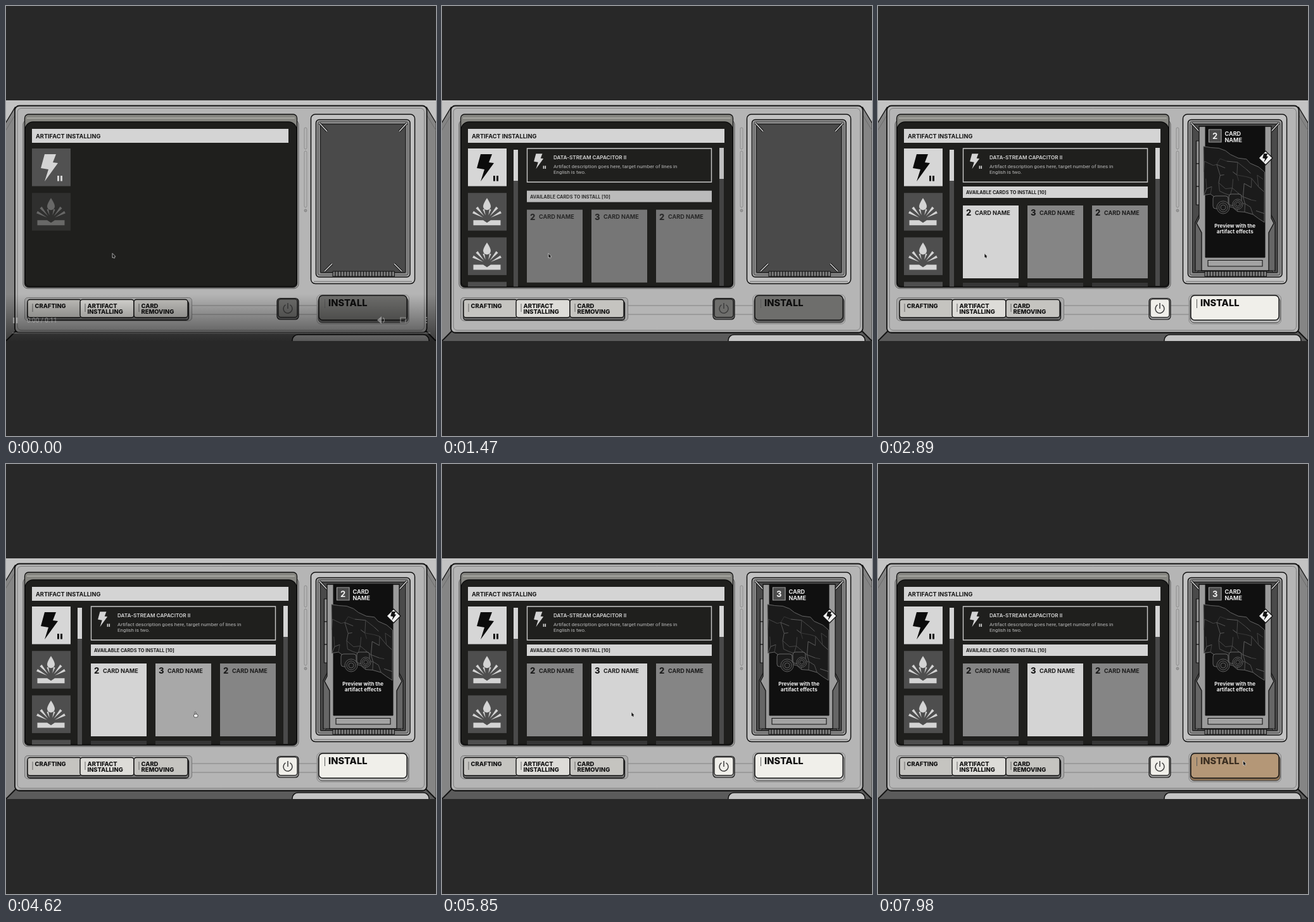
An HTML page with a canvas for the animation above (8 s loop, 679 by 679 pixels).

```html
<!DOCTYPE html>
<html lang="en">
<head>
<meta charset="utf-8">
<title>Artifact installing</title>
<style>
  html, body { margin: 0; width: 100%; height: 100%; overflow: hidden; background: #282828; }
  canvas { display: block; width: 100%; height: 100%; }
</style>
</head>
<body>
<canvas id="stage" width="679" height="679"></canvas>
<script>
const c = document.getElementById('stage').getContext('2d');
const LOOP = 8000;
const FONT = 'Inter, "Noto Sans", sans-serif';
const BODY = 'Roboto, sans-serif';
const INK = '#111', LIGHT = '#d4d4d4', GROOVE = '#828282';
const SIDES = [-1, 1];
const MID = 339.3, BAY_MID = 564;

// Main panels as [left, top, right, bottom].
const CASE = [14, 157.5, 664.5, 516];
const SCREEN = [30, 183, 459, 443];
const BAY = [481.5, 171, 645.5, 438.5];
const WELL = [489.5, 179.5, 638, 428];

const clamp = v => Math.max(0, Math.min(1, v));
const ramp = (t, start, span) => clamp((t - start) / span);
const easeOut = p => 1 - (1 - p) ** 3;
const easeInOut = p => p * p * (3 - 2 * p);
const mix = (a, b, p) => a + (b - a) * p;
const blend = (a, b, p) => a.map((v, i) => mix(v, b[i], p));
const rgb = v => `rgb(${v.map(Math.round).join(',')})`;
const gray = v => rgb([v, v, v]);

function random(seed) {
  return () => {
    seed = (seed * 16807) % 2147483647;
    return seed / 2147483647;
  };
}

function paint(fill, stroke, width = 1) {
  if (fill) { c.fillStyle = fill; c.fill(); }
  if (stroke) { c.strokeStyle = stroke; c.lineWidth = width; c.stroke(); }
}
function box([x1, y1, x2, y2], r, fill, stroke, width) {
  c.beginPath();
  c.roundRect(x1, y1, x2 - x1, y2 - y1, r);
  paint(fill, stroke, width);
}
const inset = ([x1, y1, x2, y2], d) => [x1 + d, y1 + d, x2 - d, y2 - d];
function fillRect(x, y, w, h, color) {
  c.fillStyle = color;
  c.fillRect(x, y, w, h);
}
function line(x1, y1, x2, y2, color, width = 1) {
  c.beginPath();
  c.moveTo(x1, y1);
  c.lineTo(x2, y2);
  paint(null, color, width);
}
function poly(pts, fill, stroke, width) {
  c.beginPath();
  for (const [x, y] of pts) c.lineTo(x, y);
  c.closePath();
  paint(fill, stroke, width);
}
// Closed shape from its right half, given as [distance from axis, y].
function mirrored(axis, half, ...style) {
  const right = half.map(([d, y]) => [axis + d, y]);
  const left = half.map(([d, y]) => [axis - d, y]).reverse();
  poly([...right, ...left], ...style);
}
function arc(x, y, r, from, to, fill, stroke, width) {
  c.beginPath();
  c.arc(x, y, r, from, to);
  paint(fill, stroke, width);
}
const disc = (x, y, r, ...style) => arc(x, y, r, 0, 2 * Math.PI, ...style);
function text(s, x, y, size, color, weight = 700, align = 'left', family = FONT) {
  c.font = `${weight} ${size}px ${family}`;
  c.textAlign = align;
  c.fillStyle = color;
  c.fillText(s, x, y);
}
function layer(alpha, draw) {
  if (alpha <= 0) return;
  c.save();
  c.globalAlpha *= clamp(alpha);
  draw();
  c.restore();
}
function at(x, y, scale, draw) {
  c.save();
  c.translate(x, y);
  c.scale(scale, scale);
  draw();
  c.restore();
}

function drawCase() {
  fillRect(0, 0, 679, 679, '#282828');
  c.save();
  c.beginPath();
  c.rect(0, 149, 679, 380);
  c.clip();
  fillRect(0, 149, 679, 380, '#c3c3c3');
  mirrored(MID, [[325, 160], [340, 185], [340, 529], [325, 514]], '#858585', INK, 1.3);
  mirrored(MID, [[324, 514], [340, 530]], '#5b5b5b', INK, 1.2);
  for (const s of SIDES) line(MID + s * 325, 172, MID + s * 340, 197, '#6b6b6b');
  box([452, 519, 668, 545], 9, '#c4c4c4', INK, 1.5);

  box(CASE, 7, '#b5b5b5', INK, 1.8);
  box(inset(CASE, 4), 6, null, '#7c7c7c');
  line(20, 514, 658, 514, '#858585');

  box(inset(SCREEN, -3), 7, '#a6a6a4', '#555');
  box([29.5, 171, 459.5, 444], 6, '#858580', INK, 1.3);
  line(33, 177, 456, 177, '#a5a59f', 2);

  box([471, 192, 475, 226], 2, null, '#8c8c8c');
  box([471, 229, 475, 318], 2, null, '#8c8c8c');
  disc(473, 323, 2, '#9a9a9a', GROOVE);
  for (const y of [473, 487]) line(293, y, 491, y, GROOVE);
  c.restore();
}

function drawBay() {
  box(BAY, 7, '#c2c2c2', INK, 1.5);
  line(486, 435, 641, 435, '#666');
  box(WELL, 5, '#a2a2a2', INK, 1.5);
  box(inset(WELL, 3), 3, '#8b8b8b', '#444');
  box(inset(WELL, 7), 1, '#4a4a4a', '#222', 1.3);
  box([516, 419, 613.5, 427], 0, '#7c7c7c', INK);
  for (let x = 520; x < 613; x += 4.45) line(x, 419, x, 427, INK, 1.2);
  for (const s of SIDES) {
    for (const [color, width] of [[INK, 3.6], ['#d0d0d0', 1.6]]) {
      line(BAY_MID + s * 69, 185, BAY_MID + s * 57, 198, color, width);
      line(BAY_MID + s * 61, 419, BAY_MID + s * 49, 407, color, width);
    }
  }
}

function drawBolt(color) {
  poly([[-10, -21], [8, -21], [3, -8], [11, -7], [-10, 22], [-4, 3], [-16, 1]], color);
}
function drawBoltTwo(color) {
  drawBolt(color);
  for (const x of [10, 15]) fillRect(x, 13, 3, 8.5, color);
}
function drawSplash(color) {
  c.beginPath();
  c.moveTo(0, -22);
  c.quadraticCurveTo(6, -13, 6, -9);
  c.arc(0, -9, 6, 0, Math.PI);
  c.quadraticCurveTo(-6, -13, 0, -22);
  paint(color);
  for (const s of SIDES) {
    for (let i = 0; i < 3; i++) {
      const a = 0.32 + 0.38 * i, far = i ? 25 : 17;
      const spot = (r, turn) => [s * r * Math.sin(a + turn), 12 - r * Math.cos(a + turn)];
      poly([spot(7, 0), spot(far, -0.08), spot(far, 0.08)], color);
    }
  }
  mirrored(0, [[0, 17], [6, 13], [21.5, 13], [21.5, 21], [0, 21]], color);
}

function drawScroll(x, y) {
  fillRect(x, y, 7, 218, '#4a4a4a');
  fillRect(x, y, 7, 49, LIGHT);
}
function drawList(t, picked) {
  for (let i = 0; i < 4; i++) {
    layer(ramp(t, 70 * i - 100, 90), () => {
      const y = 225 + 70.2 * i;
      const shade = i ? 0x4e : mix(0x51, 0xd6, picked);
      fillRect(41, y, 61, 59.5, gray(shade));
      at(71, y + 30, 1, () => i ? drawSplash(LIGHT) : drawBoltTwo(gray(mix(0xd4, 0x0c, picked))));
    });
  }
  layer(ramp(t, 40, 90), () => drawScroll(113, 227));
}
function drawInfo() {
  box([134.5, 225, 425.5, 278], 0, null, '#c9c9c9', 1.4);
  at(154, 245, 0.56, () => drawBoltTwo(LIGHT));
  text('DATA-STREAM CAPACITOR II', 176, 242, 8.2, LIGHT, 600);
  const lines = ['Artifact description goes here, target number of lines in', 'English is two.'];
  lines.forEach((s, i) => text(s, 176, 255.5 + 9 * i, 8, '#b9b9b9', 400, 'left', BODY));
}
function drawCards(t, shades) {
  const p = ramp(t, 1350, 140);
  layer(p, () => {
    drawScroll(438, 224);
    c.translate(0, 49 * (1 - p));
    fillRect(134, 285, 292, 18, LIGHT);
    text('AVAILABLE CARDS TO INSTALL [10]', 139, 297, 7.3, '#191919');
    shades.forEach((shade, i) => {
      const x = 134 + 102 * i;
      fillRect(x, 315, 88, 115, gray(shade));
      fillRect(x, 437, 88, 10, '#363636');
      text(2 + i % 2, x + 5, 331, 13, '#1c1c1c', 800);
      text('CARD NAME', x + 19, 329.7, 9.1, '#1c1c1c');
    });
  });
}
function drawScreen(t, shades) {
  c.save();
  box(SCREEN, [13, 13, 7, 7], '#1f1f1d', '#0d0d0d', 1.5);
  c.clip();
  fillRect(41, 194, 405, 22, LIGHT);
  text('ARTIFACT INSTALLING', 47, 208.5, 9.2, '#151515');
  drawList(t, ramp(t, 1300, 100));
  layer(ramp(t, 1300, 110), drawInfo);
  drawCards(t, shades);
  c.restore();
}

// Hull plating: a bent, jittered grid with some seams left out.
function drawShip() {
  const rnd = random(23), cols = 9, rows = 6;
  const node = Array.from({ length: cols + 1 }, (_, i) => Array.from({ length: rows + 1 }, (_, j) => {
    const u = i / cols, v = j / rows;
    const top = 226 + 36 * u * u, bottom = 296 + 46 * u;
    return [517 + 93 * u + 6 * (rnd() - 0.5), mix(top, bottom, v) + 9 * (rnd() - 0.5)];
  }));
  const upper = node.map(col => col[0]);
  const lower = node.map(col => col[rows]).reverse();
  poly([...upper, ...lower], '#1b1b1b', '#666');
  for (let i = 0; i < cols; i++) {
    for (let j = 1; j < rows; j++) {
      const tone = gray(56 + 48 * rnd());
      if (rnd() < 0.65) line(...node[i][j], ...node[i + 1][j], tone, 0.9);
      if (rnd() < 0.45) line(...node[i][j], ...node[i][j + 1], tone, 0.9);
    }
  }
  for (let i = 0; i < 2; i++) {
    const x = 545 + 23 * i, y = 318 - 5 * i, r = 10 - 2 * i;
    box([x - r - 6, y - r - 8, x + r - 2, y + 2], 4, '#1b1b1b', '#666');
    for (const k of [1, 0.7, 0.4]) disc(x, y, r * k, '#191919', '#666', 0.9);
  }
}

function drawPreview(p, cost) {
  const k = easeOut(p);
  if (!k) return;
  c.save();
  c.beginPath();
  c.rect(493, 189, 143, 234);
  c.clip();
  c.globalAlpha = k;
  const zoom = mix(0.86, 1, k);
  c.translate(BAY_MID, 294 - 6 * (1 - k));
  c.scale(zoom, zoom);
  c.translate(-BAY_MID, -294);

  for (let i = 0; i < 3; i++) box([502.5, 213 + 36 * i, 511, i < 2 ? 249 + 36 * i : 314], 0, '#8d8d8d', INK, 1.2);
  mirrored(BAY_MID, [[57, 330], [63, 342], [63, 418]], '#666', INK, 1.2);
  mirrored(BAY_MID, [[57, 190], [57, 335], [61, 343], [53, 358], [53, 418]], '#9b9b9b', INK, 1.3);
  box([517, 190, 611, 397], 0, '#101010', INK);
  box([521, 401.5, 607, 411], 0, '#a3a3a3', INK, 1.1);
  drawShip();

  box([522.5, 195, 542, 215], 0, '#4b4b4b', '#a0a0a0', 1.2);
  text(cost, 532.2, 210, 13, '#f2f2f2', 700, 'center');
  ['CARD', 'NAME'].forEach((s, i) => text(s, 547.5, 205 + 10 * i, 9, '#e8e8e8'));
  mirrored(612, [[0, 229], [11, 240], [0, 251]], '#f0f0f0', INK, 1.3);
  at(612.5, 240, 0.33, () => drawBolt(INK));

  const caption = (lines, y, gap, color) =>
    lines.forEach((s, i) => text(s, 563.7, y + gap * i, 8, color, 700, 'center'));
  caption(['Preview with the', 'artifact effects'], 349.5, 9.3, '#f0f0f0');
  layer((1 - k) * 1.5, () => caption(['Preview with', 'the artifact', 'effects'], 343, 10, '#bbb'));
  c.restore();
}

function drawTabs() {
  box([29.5, 460.5, 293.5, 497], 5, '#a9a9a9', '#777');
  box([34, 466, 288.5, 496], 4, '#6f6f6f', INK, 1.3);
  ['CRAFTING', 'ARTIFACT INSTALLING', 'CARD REMOVING'].forEach((label, i) => {
    const x = 34 + 85 * i - (i ? 2 : 0);
    box([x, 463.5, x + 85, 492], 4, i === 1 ? '#dddcd8' : '#c5c4c0', INK, 1.4);
    line(x + 8, 470, x + 8, 483, '#666');
    label.split(' ').forEach((s, row) => text(s, x + 11.5, 477 + 9.3 * row, 9.4, INK, 800));
  });
}

function drawButtons(on, hover, press) {
  const idle = blend([110, 110, 108], [240, 239, 234], on);
  box([428, 461.5, 462, 495], 5, gray(mix(95, 150, on)), INK, 1.2);
  box([430, 463, 460, 491.5], 4, rgb(idle), INK, 1.2);
  arc(445, 478, 7, -1.05, Math.PI + 1.05, null, '#3d3d3d', 1.5);
  line(445, 469, 445, 478, '#3d3d3d', 1.5);

  const face = blend(blend(idle, [230, 195, 155], hover), [180, 151, 119], press);
  const edge = blend(gray3(mix(95, 190, on)), [140, 114, 86], hover);
  box([491, 456, 636.5, 502], 6, null, '#858585');
  box([493, 460, 635, 500], 6, rgb(edge), '#3a3a3a');
  box([494, 457, 633, 496], 6, rgb(face), INK, 1.4);
  line(503.5, 463, 503.5, 477, '#5a5a5a');
  text('INSTALL', 509, 474.4, 14.7, rgb(blend(gray3(14), [60, 47, 34], press)), 800);
}
function gray3(v) {
  return [v, v, v];
}

function drawPlayer() {
  const shade = c.createLinearGradient(0, 455, 0, 529);
  shade.addColorStop(0, 'rgba(0,0,0,0)');
  shade.addColorStop(1, 'rgba(0,0,0,.55)');
  fillRect(0, 455, 679, 74, shade);
  const pale = 'rgba(205,205,205,.55)';
  for (const x of [11, 16]) fillRect(x, 492, 2.5, 9, pale);
  text('0:00 / 0:11', 33, 500, 10, pale, 400, 'left', BODY);
  poly([[586, 496], [593, 490], [593, 502]], pale);
  arc(593, 496, 4.5, -1, 1, null, pale, 1.2);
  box([623, 492, 631, 500], 0, null, pale, 1.2);
  for (const d of [-4, 0, 4]) disc(664, 496 + d, 1.1, pale);
  fillRect(10, 515.5, 660, 1.8, 'rgba(255,255,255,.25)');
}

function drawCursor(x, y, hand) {
  at(x, y, 1, () => {
    if (hand) {
      box([-1.2, 0, 0.8, 5], 1, '#f4f4f4', '#333', 0.8);
      box([-2.5, 3.5, 4, 8.5], 2, '#f4f4f4', '#333', 0.8);
    } else {
      line(1.5, 4, 3.4, 7.8, '#e8e8e8', 2.2);
      poly([[0, 0], [0, 7], [4.8, 5]], INK, '#e8e8e8', 0.7);
      line(1.5, 4, 3.2, 7.4, INK, 1.1);
    }
  });
}

function render(t) {
  const pick1 = 2010, pick2 = 5150, overInstall = 6840, press = 7220;
  const swap = ramp(t, pick2, 80);
  const hovered = start => mix(0x85, 0xa8, ramp(t, start, 100));
  const first = mix(hovered(1560), 0xd4, ramp(t, pick1, 90));
  const shades = [mix(first, 0x85, swap), mix(hovered(4360), 0xd4, swap), 0x85];

  const toCard = easeInOut(ramp(t, 4190, 290));
  const toInstall = easeInOut(ramp(t, 6400, 600));
  const within = (a, b) => t > a && t < b;
  const hand = within(1600, pick1 + 50) || within(4340, pick2 + 50) || within(overInstall, press);

  drawCase();
  drawScreen(t, shades);
  drawBay();
  if (t < pick2) drawPreview(ramp(t, pick1 + 70, 440), 2);
  else drawPreview(ramp(t, pick2, 440), 3);
  drawTabs();
  drawButtons(ramp(t, 2280, 340), ramp(t, overInstall, 140), ramp(t, press, 180));
  layer(1 - ramp(t, 330, 290), drawPlayer);
  drawCursor(168 + 131 * toCard + 277.5 * toInstall, 390.5 + toCard + 77 * toInstall, hand);
}

const start = performance.now();
function tick() {
  render((performance.now() - start) % LOOP);
  requestAnimationFrame(tick);
}
tick();
</script>
</body>
</html>
```
